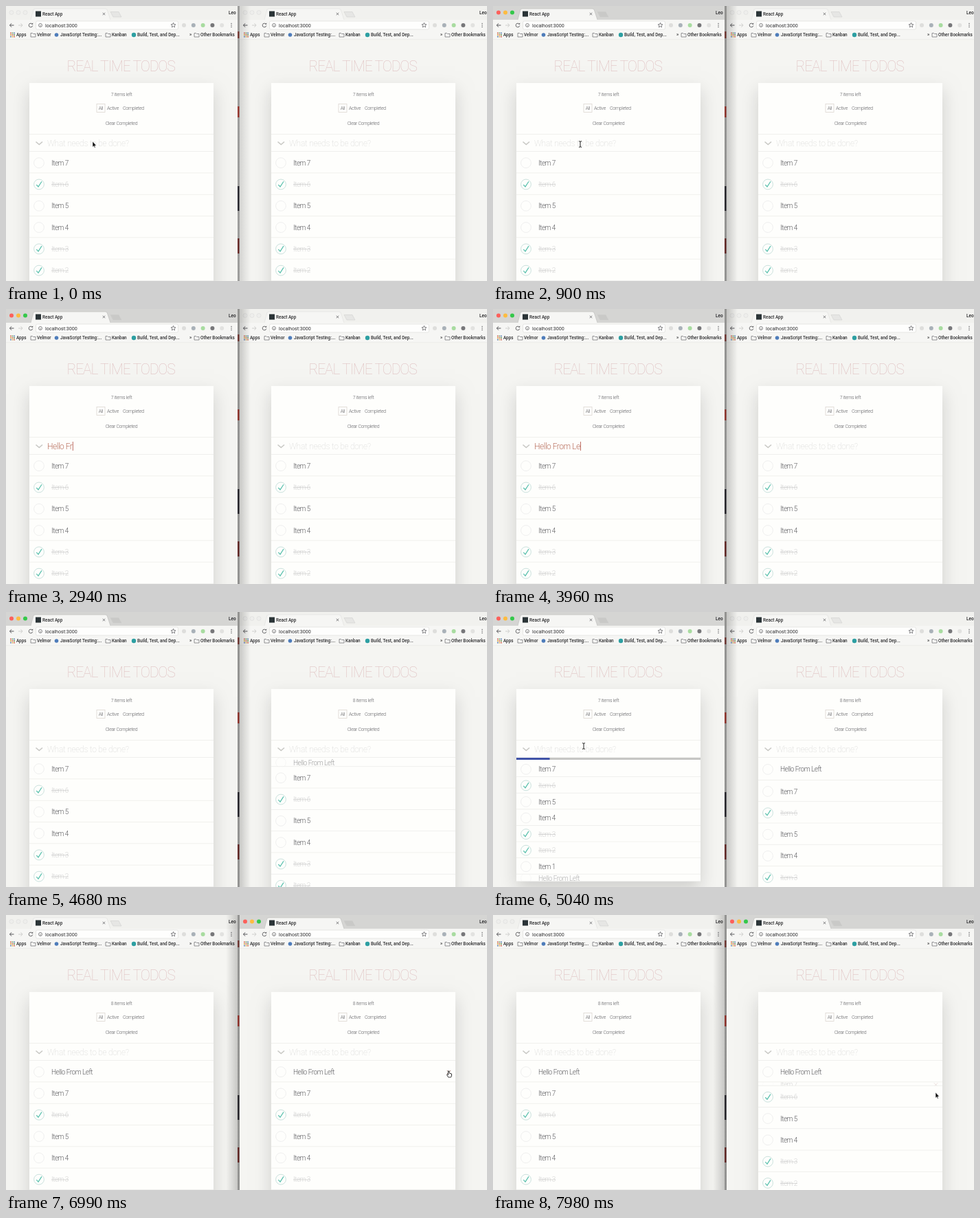
Recreate the animation shown at these times as an HTML page with a canvas. Size 700 by 400 pixels, loop 8 s.

```html
<!DOCTYPE html>
<html lang="en">
<head>
<meta charset="utf-8">
<title>Real time todos</title>
<style>
  html, body { margin: 0; width: 100%; height: 100%; overflow: hidden; background: #f5f5f2; }
  canvas { display: block; }
</style>
</head>
<body>
<canvas id="stage" width="700" height="400"></canvas>
<script>
const ctx = document.getElementById('stage').getContext('2d');
const LOOP = 8000, ROW = 31.3, LIST_TOP = 212;
const FOCUS_LEFT = 400, TYPE_START = 1130, TYPE_STEP = 227, SUBMIT = 4470, RECEIVE = 4570;
const LOAD_START = 4860, LOAD_END = 5260, FOCUS_RIGHT = 6300, DELETE = 7779;
const MESSAGE = 'Hello From Left';
const PAGE = '#f5f5f2', CARD = '#fefefc', RULE = '#ededea', INK = '#5c5c60';
const ITEMS = [7, 6, 5, 4, 3, 2, 1].map(n => ({ text: 'Item ' + n, done: [6, 3, 2].includes(n) }));
const HELLO = { text: MESSAGE, done: false };
const POINTER = [
  [0, 127, 201], [4700, 127, 201], [5040, 132, 195], [5200, 132, 195], [5940, 604, 236],
  [6400, 606, 236], [6900, 645, 231], [7250, 645, 231], [7600, 645, 262], [8000, 645, 262]
];

// Underdamped spring from 0 to 1: stiffness 120, damping 14.
function spring(ms) {
  const s = Math.max(0, ms) / 1000, decay = 7, freq = Math.sqrt(120 - decay * decay);
  return 1 - Math.exp(-decay * s) * (Math.cos(freq * s) + decay / freq * Math.sin(freq * s));
}

function pointerAt(t) {
  const i = POINTER.findIndex(p => p[0] > t);
  const [t0, x0, y0] = POINTER[i - 1], [t1, x1, y1] = POINTER[i];
  const k = (t - t0) / (t1 - t0), e = k * k * (3 - 2 * k);
  return { x: x0 + (x1 - x0) * e, y: y0 + (y1 - y0) * e };
}

function text(str, x, y, size, color, { weight = 300, spacing = 0, align = 'left' } = {}) {
  ctx.font = `${weight} ${size}px Roboto, sans-serif`;
  ctx.letterSpacing = spacing + 'px';
  ctx.textAlign = align;
  ctx.textBaseline = 'alphabetic';
  ctx.fillStyle = color;
  ctx.fillText(str, x, y + size * 0.36);
  return ctx.measureText(str).width;
}

function rect(x, y, w, h, color) {
  ctx.fillStyle = color;
  ctx.fillRect(x, y, w, h);
}

function path(points, { fill, stroke, width = 1, close = false }) {
  ctx.beginPath();
  points.forEach(([x, y]) => ctx.lineTo(x, y));
  if (close) ctx.closePath();
  if (fill) { ctx.fillStyle = fill; ctx.fill(); }
  if (stroke) { ctx.strokeStyle = stroke; ctx.lineWidth = width; ctx.stroke(); }
}

function circle(x, y, r, { fill, stroke, width = 1, from = 0, to = 7 }) {
  ctx.beginPath();
  ctx.arc(x, y, r, from, to);
  if (fill) { ctx.fillStyle = fill; ctx.fill(); }
  if (stroke) { ctx.strokeStyle = stroke; ctx.lineWidth = width; ctx.stroke(); }
}

function cross(x, y, r, color, width = 0.8) {
  path([[x - r, y - r], [x + r, y + r]], { stroke: color, width });
  path([[x + r, y - r], [x - r, y + r]], { stroke: color, width });
}

function folder(x, y) {
  path([[x, y - 2.5], [x + 2.5, y - 2.5], [x + 3.5, y - 1.5], [x + 7, y - 1.5], [x + 7, y + 3], [x, y + 3]],
    { stroke: '#77777a', width: 0.8, close: true });
}

function star(x, y, r) {
  const points = Array.from({ length: 10 }, (_, i) => {
    const a = i * Math.PI / 5 - Math.PI / 2, d = i % 2 ? r * 0.45 : r;
    return [x + d * Math.cos(a), y + d * Math.sin(a)];
  });
  path(points, { stroke: '#606064', width: 0.8, close: true });
}

// extra: how much wider than the left window this one is
function browser(active, extra) {
  const dark = '#555558', label = '#2c2c2e', bar = '#f6f6f4';
  rect(0, 0, 400, 20, active ? '#d5d5d3' : '#f1f1ee');
  ['#fc605b', '#fdbc40', '#34c84a'].forEach((color, i) =>
    circle(8 + i * 10, 9.5, 3, active ? { fill: color } : { fill: '#eeeeec', stroke: '#dcdcda', width: 0.6 }));
  path([[36, 20], [40, 5], [42, 4], [145, 4], [147, 5], [152, 20]],
    { fill: bar, stroke: active ? '#bdbdbb' : '#e0e0de', width: 0.6 });
  path([[152, 8.5], [164, 8.5], [168, 16], [156, 16]],
    { fill: active ? '#c9c9c7' : '#e6e6e4', stroke: '#cbcbc9', width: 0.5, close: true });
  rect(43, 7.5, 8, 8, '#2b3437');
  text('React App', 53, 11.5, 6.4, label, { weight: 500 });
  cross(142.5, 11.5, 1.7, dark);
  text('Leo', 324 + extra, 9.5, 6.4, '#1e1e20', { weight: 500 });

  rect(0, 20, 400, 29, bar);
  path([[11.5, 28], [5.5, 28], [8, 25.3]], { stroke: dark });
  path([[5.5, 28], [8, 30.7]], { stroke: dark });
  path([[18, 28], [24, 28], [21.5, 25.3]], { stroke: '#cfcfcd' });
  path([[24, 28], [21.5, 30.7]], { stroke: '#cfcfcd' });
  circle(36, 28, 2.8, { stroke: dark, width: 0.9, from: 0.2, to: 5.5 });
  path([[36.8, 26.8], [39.2, 26.8], [39.2, 24.4]], { fill: dark });
  ctx.beginPath();
  ctx.roundRect(43.5, 22, 207 + extra, 12, 2);
  ctx.fillStyle = '#fefefd';
  ctx.fill();
  ctx.strokeStyle = '#dededc';
  ctx.lineWidth = 0.7;
  ctx.stroke();
  circle(50, 28, 2.5, { stroke: dark, width: 0.7 });
  rect(49.7, 27.6, 0.7, 2, dark);
  text('localhost:3000', 57, 28, 7.1, label, { weight: 400 });
  star(243.5 + extra, 28, 3.6);
  ['#dededc', '#a9b1b8', '#a8dca0', '#77777a', '#e2e2e0'].forEach((color, i) =>
    circle(259 + i * 13.8 + extra, 28, 3, { fill: color }));
  [-2.5, 0, 2.5].forEach(dy => circle(328 + extra, 28 + dy, 0.7, { fill: dark }));

  for (let i = 0; i < 9; i++)
    rect(6 + i % 3 * 2.6, 38.5 + Math.floor(i / 3) * 2.6, 1.8, 1.8, ['#d96b5c', '#74a464', '#6485bd', '#d5ad4b'][i % 4]);
  const mark = (str, x) => text(str, x, 42, 6.4, label, { weight: 500 });
  mark('Apps', 15);
  folder(36, 42);
  mark('Velmor', 45);
  circle(73.5, 42, 2.8, { fill: '#4e7cba' });
  mark('JavaScript Testing:...', 79);
  folder(145, 42);
  mark('Kanban', 154);
  circle(186, 42, 3.2, { fill: '#2d9fa2' });
  mark('Build, Test, and Dep...', 191);
  mark('»', 267 + extra);
  folder(274 + extra, 42);
  mark('Other Bookmarks', 283 + extra);
  rect(0, 48.5, 400, 0.7, '#e8e8e6');
}

function drawRow(row, top, hovered) {
  const h = row.size * ROW, cy = top + h / 2 + 0.5;
  ctx.save();
  ctx.beginPath();
  ctx.rect(34, top, 268, h);
  ctx.clip();
  ctx.globalAlpha = Math.max(0, Math.min(1, row.size * 1.4));
  if (row.done) {
    circle(48, cy, 7.4, { stroke: '#bddad5', width: 0.8 });
    path([[44.3, cy + 0.5], [47, cy + 3.5], [52, cy - 4.2]], { stroke: '#5dc2af', width: 1.3 });
    text(row.text, 66, cy, 10, '#d6d6d6', { spacing: -0.5 });
    rect(66, cy, 25, 0.7, '#c6c6c6');
  } else {
    circle(48, cy, 7.4, { stroke: '#ebebeb', width: 0.8 });
    text(row.text, 66, cy, 10, INK, { spacing: -0.5 });
  }
  if (hovered) cross(292.5, cy + 0.5, 2.7, '#a5766f', 0.9);
  ctx.restore();
  rect(34, top + h - 0.8, 268, 0.8, RULE);
}

function app({ count, typed, caret, rows, loading, hoverY }) {
  text('REAL TIME TODOS', 167, 87.5, 21.2, '#dfbfc0', { weight: 100, spacing: -1.2, align: 'center' });

  const listTop = LIST_TOP + (loading === null ? 0 : 4.5);
  const height = listTop - 112 + rows.reduce((sum, row) => sum + row.size * ROW, 0);
  ctx.save();
  ctx.shadowColor = 'rgba(0,0,0,.16)';
  ctx.shadowBlur = 24;
  ctx.shadowOffsetY = 11;
  rect(34, 112, 268, height, CARD);
  ctx.restore();

  const small = (str, x, y, align) => text(str, x, y, 7, INK, { spacing: -0.3, align });
  small(count + ' items left', 168, 128, 'center');
  ctx.strokeStyle = '#dcd6d2';
  ctx.lineWidth = 0.8;
  ctx.strokeRect(132, 142.5, 12, 12);
  small('All', 138, 148.5, 'center');
  small('Active', 147, 148.5);
  small('Completed', 170, 148.5);
  small('Clear Completed', 168, 170.5, 'center');
  rect(34, 186, 268, 0.8, RULE);

  path([[43.5, 197.5], [48.3, 201.5], [53, 197.5]], { stroke: '#c8c8c4', width: 1.6 });
  let width = 0;
  if (typed) width = text(typed, 60, 199.5, 12, '#b9705f', { spacing: -0.5 });
  else text('What needs to be done?', 60, 199.5, 12, '#d2d2d0', { weight: 100, spacing: -0.25 });
  if (caret) rect(60.5 + width, 193, 0.9, 13, '#b85e52');
  rect(34, LIST_TOP - 0.8, 268, 0.8, RULE);

  if (loading !== null) {
    rect(34, 212, 268, 3, '#c6c6c4');
    rect(34, 212, 268 * loading, 3, '#4053a8');
  }
  let top = listTop;
  for (const row of rows) {
    const end = top + row.size * ROW;
    drawRow(row, top, row.closing || (hoverY >= top && hoverY < end));
    top = end;
  }
}

function drawWindow(x, pageX, width, extra, active, state) {
  ctx.save();
  ctx.beginPath();
  ctx.rect(x, 0, width, 400);
  ctx.clip();
  rect(x, 0, width, 400, PAGE);
  ctx.translate(x, 0);
  browser(active, extra);
  ctx.translate(pageX - x, 0);
  app(state);
  ctx.restore();
}

function shade(from, to, alpha) {
  const g = ctx.createLinearGradient(from, 0, to, 0);
  g.addColorStop(0, `rgba(0,0,0,${alpha})`);
  g.addColorStop(1, 'rgba(0,0,0,0)');
  rect(Math.min(from, to), 0, Math.abs(to - from), 400, g);
}

function drawPointer(x, y, kind) {
  ctx.save();
  ctx.translate(x, y);
  if (kind === 'beam') {
    path([[-2, -4.5], [0, -3.7], [2, -4.5]], { stroke: '#222' });
    path([[0, -3.7], [0, 3.7]], { stroke: '#222' });
    path([[-2, 4.5], [0, 3.7], [2, 4.5]], { stroke: '#222' });
  } else if (kind === 'hand') {
    path([[-1.5, -4], [0, -4], [0.3, -0.8], [3.5, 0], [3.5, 3], [2.5, 5], [-1.3, 5], [-3.5, 1.5], [-2.8, 0.6], [-1.5, 1.7]],
      { fill: '#fff', stroke: '#222', width: 0.9, close: true });
  } else {
    path([[-1, -4], [-1, 4.2], [0.8, 2.6], [2, 5.2], [3.2, 4.6], [2, 2.2], [4.4, 2]],
      { fill: '#111', stroke: '#fff', width: 0.5, close: true });
  }
  ctx.restore();
}

const full = item => ({ ...item, size: 1 });

function leftRows(t) {
  if (t < LOAD_START) return ITEMS.map(full);
  if (t < LOAD_END) return [
    ...ITEMS.map(item => ({ ...item, size: spring(t - LOAD_START) })),
    { ...HELLO, size: spring(t - LOAD_START - 86) }
  ];
  return [{ ...HELLO, size: spring(t - LOAD_END) }, ...ITEMS.map(full)];
}

function rightRows(t) {
  const rows = ITEMS.map(full);
  if (t >= DELETE) Object.assign(rows[0], { size: 1 - spring(t - DELETE), closing: true });
  return t < RECEIVE ? rows : [{ ...HELLO, size: spring(t - RECEIVE) }, ...rows];
}

function draw(t) {
  const leftActive = t >= FOCUS_LEFT && t < FOCUS_RIGHT, rightActive = t >= FOCUS_RIGHT;
  const { x, y } = pointerAt(t);
  const letters = t < SUBMIT ? Math.max(0, Math.ceil((t - TYPE_START) / TYPE_STEP)) : 0;
  const blinking = t >= FOCUS_LEFT && t < LOAD_START && t % 1000 < 500;
  const hovering = rightActive && t < DELETE;

  drawWindow(0, 0, 337, 0, leftActive, {
    count: t < LOAD_END ? 7 : 8,
    typed: MESSAGE.slice(0, letters),
    caret: letters > 0 || blinking,
    rows: leftRows(t),
    loading: t >= LOAD_START && t < LOAD_END ? (t - LOAD_START) / 1000 : null
  });
  drawWindow(340, 352, 360, 25, rightActive, {
    count: t >= RECEIVE && t < DELETE ? 8 : 7,
    typed: '', caret: false, loading: null,
    rows: rightRows(t),
    hoverY: hovering ? y : -1
  });

  // Desktop showing between the windows
  rect(337, 0, 3, 400, '#b9b9b7');
  [[37, 10, '#8e4a44'], [146, 16, '#b4433a'], [262, 36, '#33323a'], [338, 22, '#7c3532']]
    .forEach(([top, h, color]) => rect(337, top, 2.5, h, color));
  if (rightActive) shade(340, 320, 0.22);
  else shade(337, 356, leftActive ? 0.22 : 0.16);

  if (t < TYPE_START || t > 4700) {
    const beam = (t >= FOCUS_LEFT && t < TYPE_START) || (t > 4700 && x < 302 && y < 212);
    drawPointer(x, y, beam ? 'beam' : hovering && x > 638 ? 'hand' : 'arrow');
  }
}

function frame() {
  draw(performance.now() % LOOP);
  requestAnimationFrame(frame);
}
frame();
</script>
</body>
</html>
```
